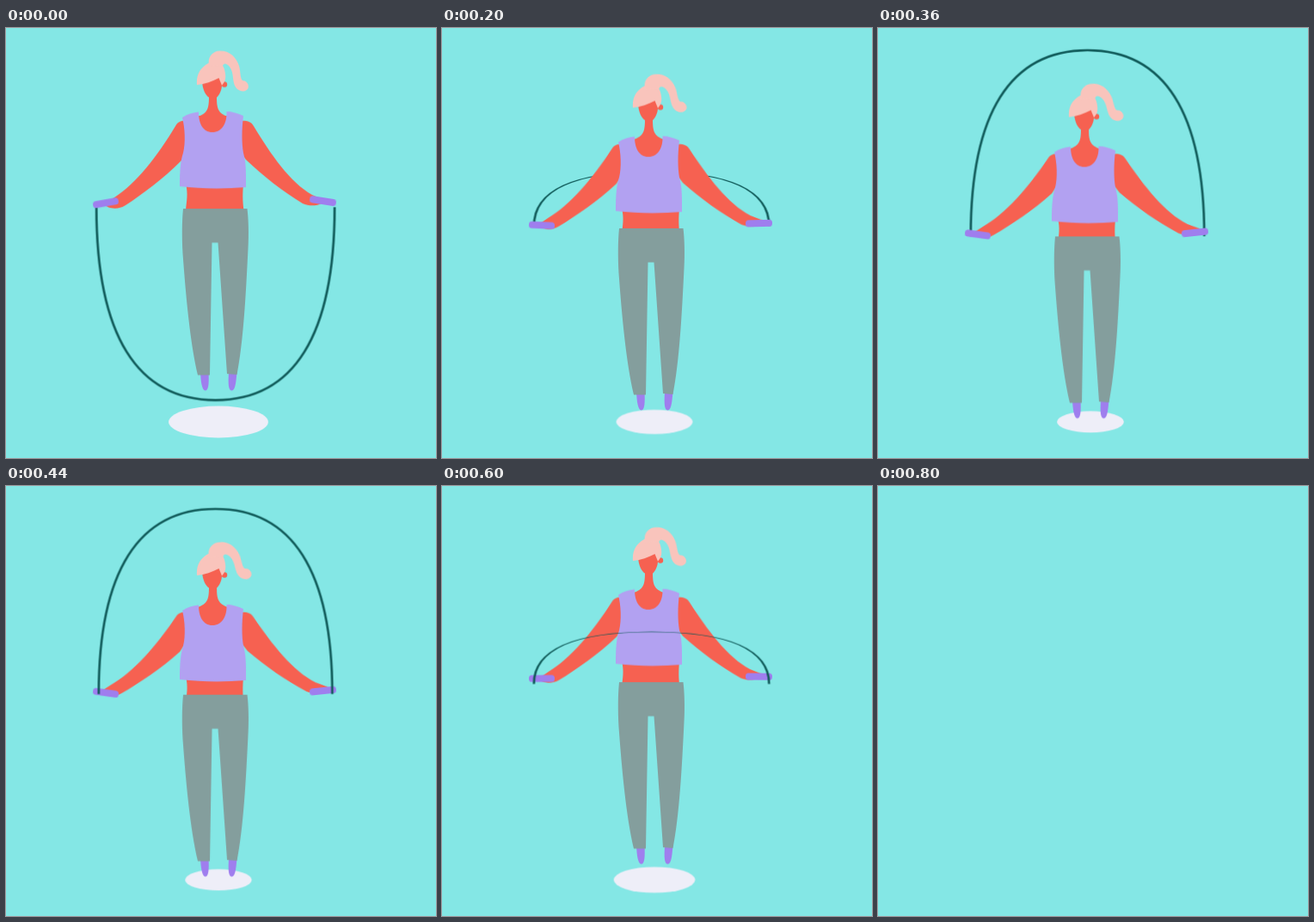
Animation, 500 px wide and 500 px high, one loop 820 ms. Source, as an HTML page:

```html
<!DOCTYPE html>
<html lang="en">
<head>
<meta charset="utf-8">
<title>Rope skipping</title>
<style>
  html, body { margin: 0; width: 100%; height: 100%; overflow: hidden; background: #84e7e5; }
  svg { display: block; width: 100vw; height: 100vh; animation: blink 820ms step-end infinite; }

  .hop { --y: 0px; --r: 0deg; --k: 0; animation: hop 820ms linear infinite; }
  .legs { --y: 32.8px; }
  .torso { --y: 41px; }
  .head { --y: 38px; }
  .tail { --y: 39.5px; --r: -8deg; transform-origin: 245px 40px; }
  .arm { --y: 39px; }
  .arm.left { --r: 3.2deg; transform-origin: 205px 120px; }
  .arm.right { --r: -3.2deg; transform-origin: 278px 120px; }
  .grip { --y: 37.3px; }
  .grip.left { --r: 18deg; transform-origin: 116px 203.3px; }
  .grip.right { --r: -15deg; transform-origin: 368.5px 201px; }
  .shadow { --k: -.333; transform-origin: 247px 458px; }

  .rope { fill: none; stroke: #105a59; stroke-width: 2.7; animation: swing 820ms infinite; }
  .front { animation: front 820ms step-end infinite; }
  .back { animation: back 820ms step-end infinite; }

  .skin { fill: #f66151; }
  .hair { fill: #f9c4bc; }
  .top { fill: #b2a1f1; }
  .pants { fill: #849e9d; }
  .violet { fill: #9f7eee; }

  /* drop, settle, rise, then one empty beat */
  @keyframes hop {
    0%, 97.561%, to { transform: translateY(0) rotate(0deg) scale(1); }
    34.146% {
      transform: translateY(calc(var(--y) * .975)) rotate(calc(var(--r) * .975))
        scale(calc(1 + var(--k) * .975));
    }
    53.659% { transform: translateY(var(--y)) rotate(var(--r)) scale(calc(1 + var(--k))); }
  }
  @keyframes swing {
    0% {
      transform: translate(243.6px, 208.2px) scale(1, 1);
      animation-timing-function: cubic-bezier(.167, .167, .667, 1);
    }
    48.78% {
      transform: translate(243.6px, 242.8px) scale(.98, -1);
      animation-timing-function: cubic-bezier(.333, 0, .833, .833);
    }
    97.561%, to { transform: translate(243.6px, 208.2px) scale(1, 1); }
  }
  @keyframes front { 0% { visibility: hidden; } 48.78%, to { visibility: visible; } }
  @keyframes back { 0% { visibility: visible; } 48.78%, to { visibility: hidden; } }
  @keyframes blink { 0% { opacity: 1; } 97.561%, to { opacity: 0; } }
</style>
</head>
<body>
<svg viewBox="0 0 500 500">
  <defs>
    <path id="arc" d="M-138.500 0C-138.500 150-91 225.500 0 225.500S138.500 150 138.500 0"/>
  </defs>

  <ellipse class="hop shadow" cx="247" cy="458" rx="58" ry="18.5" fill="#eeeef8"/>
  <g class="back"><use class="rope" href="#arc"/></g>

  <g class="hop legs violet">
    <path d="M226 400H235.500C236 410 236 421.500 231.800 421.500S226.500 410 226 400Z"/>
    <path d="M259 400H268.500C267.500 410 267 421.500 262.500 421.500S258.500 410 259 400Z"/>
  </g>

  <g class="hop arm left">
    <path class="skin" d="M212 108C205 107 200 108 197 114C176 149 151 181 126 197L115 205C118 210 130 212 139 206C159 193 183 175 204 154L212 140Z"/>
  </g>
  <g class="hop arm right">
    <path class="skin" d="M270 108C279 107 285 108 288 114C308 147 330 179 356 194L370 200C367 207 354 208 345 204C322 190 299 172 279 153L270 140Z"/>
  </g>

  <path class="hop torso skin" d="M224 102H257V130L276 180C275 194 275 200 276.500 212H209C210 200 212 194 209 180L224 130Z"/>
  <path class="hop legs pants" d="M206 210H280.500C282 222 282.500 240 281.500 256C279 310 276 365 268.500 403L257 402L246.500 249.500H239.500L237 403.500H223C214 365 209 310 205.500 262C204.500 243 204.500 225 206 210Z"/>
  <path class="hop head skin" d="M236 80C236 94 234 99 223 103V112H258V103C247 99 245 94 245 80Z"/>
  <path class="hop torso top" d="M205 104C211 100 217 98 224 97.500C224 111 229 121 240 121S257 111 256.500 97C263 97 270 99 276 102C274 118 274 134 276 145C278 153 279.500 158 279 185C254 187 228 187 202 184C202 165 203 154 206 145C209 133 208 116 205 104Z"/>

  <g class="hop head">
    <path class="skin" d="M228 60C228 72 233 79 236 80.500V84H245V80.500C248 78 251 72 251 66V55H228Z"/>
    <circle class="skin" cx="254" cy="65.500" r="3.200"/>
    <path class="hair" d="M222 66C221 54 226 46 235 41C244 37 252 40 254 48C256 56 256 61 251 66.500L247.500 58C240 62 231 65 222 66Z"/>
  </g>
  <path class="hop tail hair" d="M236 43C234 33 241 27 248 26.500C260 26 268 34 271 44C273 51 272 58 275 61C280 61 283 66 281.500 70C279 75 272 74 268 70C262 63 266 53 260 45C257 41 253 40 252 44Z"/>

  <g class="hop grip left">
    <rect class="violet" x="101" y="199.300" width="30" height="8" rx="3.500" transform="rotate(-10 116 203.300)"/>
  </g>
  <g class="hop grip right">
    <rect class="violet" x="353" y="197" width="31" height="8" rx="3.500" transform="rotate(9 368.500 201)"/>
  </g>

  <g class="front"><use class="rope" href="#arc"/></g>
</svg>
</body>
</html>
```
